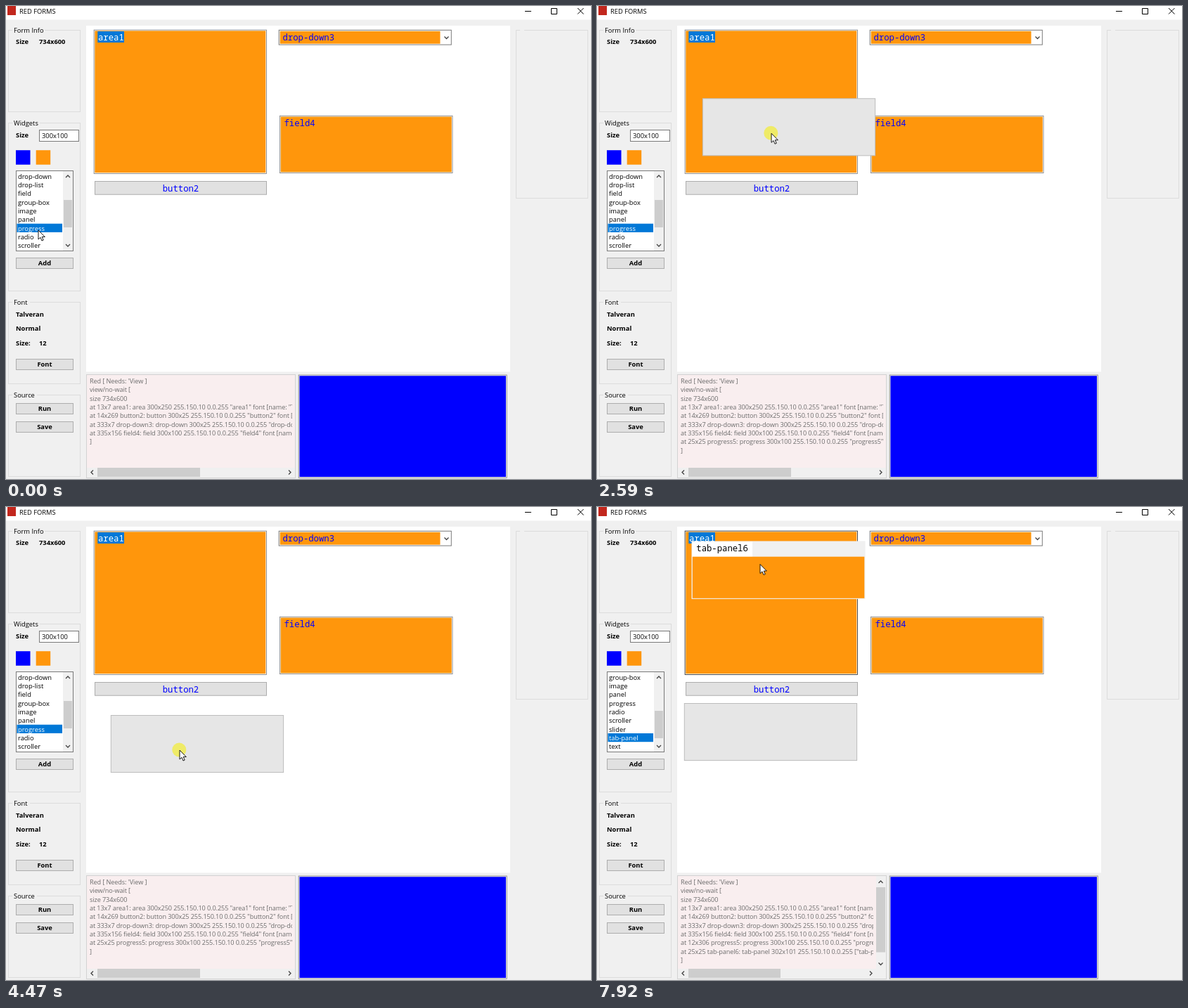
Animation of 832x673 px, one loop 7.99 s. Source, as an HTML page:

```html
<!DOCTYPE html>
<html lang="en">
<head>
<meta charset="utf-8">
<title>Red Forms</title>
<style>
  html, body { margin: 0; width: 100%; height: 100%; overflow: hidden; background: #f0f0f0; }
  svg { display: block; width: 832px; height: 673px; }
  text { font: 9.35px "Open Sans", "Noto Sans", sans-serif; white-space: pre; }
  .code { font-size: 9.15px; letter-spacing: -.1px; }
  .bold { font-weight: 700; }
  .mono { font: 12.25px "Noto Sans Mono", "DejaVu Sans Mono", monospace; }
  .mid { text-anchor: middle; }
  .button { fill: #e1e1e1; stroke: #adadad; }
  .hover { fill: #e5f1fb; stroke: #0078d7; }
  .down { fill: #cce4f7; stroke: #005499; }
</style>
</head>
<body>
<svg id="stage" viewBox="0 0 832 673" xmlns="http://www.w3.org/2000/svg"></svg>
<script>
const LOOP = 7990;
const ORANGE = '#ff960c', BLUE = '#0000ff', SELECT = '#0078d7', EDGE = '#7a7a7a';
const UNIT = .82; // one form pixel on the stage

// Shape helpers: corners are x1, y1, x2, y2
const box = (a, b, c, d, fill, extra = '') =>
  `<rect x="${a}" y="${b}" width="${c - a}" height="${d - b}" fill="${fill}" ${extra}/>`;
const frame = (a, b, c, d, fill, stroke, extra = '') =>
  box(a + .5, b + .5, c - .5, d - .5, fill, `stroke="${stroke}" ${extra}`);
const label = (x, y, text, cls = '', fill = '#000') =>
  `<text x="${x}" y="${y}" class="${cls}" fill="${fill}">${text}</text>`;
const line = (d, stroke = '#000', width = 1) =>
  `<path d="${d}" fill="none" stroke="${stroke}" stroke-width="${width}"/>`;
const group = (id, content, extra = '') => `<g id="${id}" ${extra}>${content}</g>`;

const chevron = (x, y, dx, dy) => line(dx
  ? `M${x - dx * 1.5} ${y - 3}l${dx * 3} 3l${-dx * 3} 3`
  : `M${x - 3} ${y - dy * 1.5}l3 ${dy * 3}l3 ${-dy * 3}`, '#444', 1.3);

const groupBox = (y1, y2, title, x = 3, gap = 9) =>
  frame(x, y1, x + 103, y2, 'none', '#dcdcdc') +
  box(x + 6, y1 - 2, x + 6 + gap, y1 + 2, '#f0f0f0') + label(x + 8, y1 + 4, title);

const button = (y, text, id = '') =>
  `<rect id="${id}" class="button" x="14.5" y="${y + .5}" width="81" height="15"/>` +
  label(55, y + 11.4, text, 'bold mid');

const sunken = (a, b, c, d, fill, id = '') => {
  const half = UNIT / 2, inset = UNIT * 2;
  return box(a + half, b + half, c - half, d - half, '#fff',
    `stroke="${EDGE}" stroke-width="${UNIT}" id="${id}"`) +
    box(a + inset, b + inset, c - inset, d - inset, fill);
};

const listView = (items, selected, thumb) => items.map((item, i) => {
  const y = 241.9 + i * 12.3, on = i === selected;
  return (on ? box(15.5, y - 6, 80, y + 6.2, SELECT) : '') +
    label(17, y + 3.9, item, '', on ? '#fff' : '#000');
}).join('') + box(82, thumb, 94, thumb + 39, '#cdcdcd');

const widgets = ['drop-down', 'drop-list', 'field', 'group-box', 'image', 'panel',
  'progress', 'radio', 'scroller', 'slider', 'tab-panel', 'text'];

const windowParts =
  box(0, 0, 832, 673, '#f0f0f0') + box(0, 0, 832, 19.5, '#fff') +
  box(2, 0, 14, 13, '#c2271d') + label(19, 10.5, 'RED FORMS') +
  line('M738 7.5h9M775.5 3.5h8v8h-8zM813 3l8.5 8.5M821.5 3l-8.5 8.5') +
  box(114, 28, 717, 520.5, '#fff');

const sidebar =
  groupBox(34, 151, 'Form Info', 3, 46) +
  label(14, 54, 'Size', 'bold') + label(47, 54, '734x600', 'bold') +
  groupBox(166, 406, 'Widgets', 3, 39) +
  label(14, 186.5, 'Size', 'bold') +
  frame(47, 176, 104, 193, '#fff', EDGE) + label(51, 188, '300x100') +
  box(14, 205.2, 34.5, 225.7, BLUE) + box(42.7, 205.2, 63.2, 225.7, ORANGE) +
  frame(14, 234, 96, 349, '#fff', EDGE) + box(81, 235, 95, 348, '#f0f0f0') +
  group('listBefore', listView(widgets.slice(0, 9), 6, 276)) +
  group('listAfter', listView(widgets.slice(3), 7, 290)) +
  chevron(88, 242.5, 0, -1) + chevron(88, 340.5, 0, 1) +
  button(358, 'Add', 'add') +
  groupBox(421, 538, 'Font', 3, 25) +
  ['Talveran', 'Normal', 'Size:'].map((s, i) => label(14, 441.7 + i * 20.4, s, 'bold')).join('') +
  label(47, 482.5, '12', 'bold') + button(502, 'Font') +
  groupBox(553, 670, 'Source', 3, 35) + button(565, 'Run') + button(591, 'Save') +
  groupBox(34, 274, '', 725, 6);

const form =
  sunken(124.7, 33.7, 370.9, 238.8, ORANGE, 'area') +
  box(130.3, 36, 168, 52, SELECT) + label(131, 48.5, 'area1', 'mono', '#fff') +
  frame(387.7, 33.8, 633.8, 55.6, '#fff', EDGE) + box(389.7, 35.8, 617.5, 53.7, ORANGE) +
  label(393.5, 48.5, 'drop-down3', 'mono', BLUE) + chevron(626.5, 45, 0, 1) +
  sunken(389, 155.9, 635.4, 238, ORANGE) + label(395.5, 170.8, 'field4', 'mono', BLUE) +
  frame(126, 249, 371, 268.7, '#e1e1e1', '#adadad') +
  label(248.5, 263.5, 'button2', 'mono mid', BLUE) +
  group('progress', frame(0, 0, 246.3, 82.1, '#e6e6e6', '#bcbcbc')) +
  group('tabs',
    box(0, 0, 247, 82.4, '#f0f0f0') + box(.8, .8, 86.5, 23, '#fff') +
    box(1.3, 22.2, 245.8, 81.3, ORANGE) + label(6.8, 14.7, 'tab-panel6', 'mono'),
    'transform="translate(134.5 48.5)"');

const codeLines = Array.from({ length: 10 }, (_, i) =>
  `<text class="code" x="119" y="${537 + i * 12.35}" fill="#6d6d6d"></text>`).join('');

const bottom =
  `<clipPath id="clip"><rect id="clipBox" x="115" y="525" width="292" height="131"/></clipPath>` +
  frame(114, 524, 412, 672, '#f9eeef', '#d2d2d2') +
  group('codeText', codeLines, 'clip-path="url(#clip)"') +
  box(115, 657, 411, 671, '#f0f0f0') + chevron(122.5, 663.5, -1, 0) +
  group('barShort', box(130, 657, 276, 670, '#cdcdcd') + chevron(403.5, 663.5, 1, 0)) +
  group('barLong', box(397, 525, 411, 671, '#f0f0f0') + box(397, 541, 410, 633.5, '#cdcdcd') +
    box(130, 657, 261, 670, '#cdcdcd') + chevron(389.5, 663.5, 1, 0) +
    chevron(403.5, 533.5, 0, -1) + chevron(403.5, 650, 0, 1)) +
  sunken(415.8, 524.6, 712.6, 671.6, BLUE);

const pointer = group('cursor',
  `<circle id="press" cx="-.7" cy="-.5" r="10" fill="#f0eb50" fill-opacity=".85"/>
   <path d="M0 0V13L3 10.3L5 15L7.2 14L5.2 9.5H9.3Z" fill="#fff" stroke="#000" stroke-width=".9"/>`);

document.getElementById('stage').innerHTML = windowParts + sidebar + form + bottom + pointer;
const el = id => document.getElementById(id);
const show = (id, on) => { el(id).style.display = on ? '' : 'none'; };

const bursts = [[180, 580, 7], [790, 1570, 12], [1640, 2400, 12], [2470, 3220, 13],
  [3290, 4070, 13], [4140, 4920, 13], [4970, 5480, 8], [5610, 5610, 1],
  [5860, 6640, 13], [6710, 7480, 12], [7530, 7920, 7]];
const ticks = [0, ...bursts.flatMap(([from, to, n]) =>
  Array.from({ length: n }, (_, i) => from + (n > 1 ? (to - from) * i / (n - 1) : 0)))];
const recorded = t => ticks.findLast(tick => tick <= t + 12);

// Pointer path: time, x, y
const path = [[0, 46, 319], [115, 46, 319], [580, 58, 369], [1400, 58, 369],
  [1640, 76, 344], [1900, 150, 230], [2190, 233, 98.5], [2262, 234, 102],
  [2400, 240, 132], [2970, 263.5, 276], [3220, 272, 313], [3485, 347, 348],
  [3800, 374, 359], [4070, 321, 360], [4465, 247, 346], [4920, 233, 345],
  [5480, 222, 329], [5609, 222, 329], [5610, 48, 325], [5800, 48, 325],
  [6150, 96, 291], [6640, 58, 356], [6780, 55, 368], [7290, 55, 368],
  [7480, 80, 345], [7530, 97, 318], [7920, 232, 81.5], [LOOP, 232, 81.5]];

function pointerAt(t) {
  const i = Math.max(1, path.findIndex(key => key[0] >= t));
  const [t0, x0, y0] = path[i - 1], [t1, x1, y1] = path[i];
  const k = (t - t0) / (t1 - t0);
  return [x0 + (x1 - x0) * k, y0 + (y1 - y0) * k];
}

const within = (t, ...spans) => spans.some(([from, to]) => t >= from && t < to);
const ADDED = 1080, GRABBED = 2180, DROPPED = 5600, TABBED = 7150;

function source(t) {
  const tail = name => `255.150.10 0.0.255 "${name}" font [name: "Talveran" size: 12]`;
  const out = ["Red [ Needs: 'View ]", 'view/no-wait [', 'size 734x600',
    `at 13x7 area1: area 300x250 ${tail('area1')}`,
    `at 14x269 button2: button 300x25 ${tail('button2')}`,
    `at 333x7 drop-down3: drop-down 300x25 ${tail('drop-down3')}`,
    `at 335x156 field4: field 300x100 ${tail('field4')}`];
  if (t >= ADDED) out.push(`at ${t < DROPPED ? '25x25' : '12x306'} progress5: progress 300x100 ${tail('progress5')}`);
  if (t >= TABBED) out.push('at 25x25 tab-panel6: tab-panel 302x101 255.150.10 0.0.255 ["tab-panel6" []]');
  return [...out, ']'];
}

const codeNodes = document.querySelectorAll('.code');
let last = -1;

function draw(now) {
  const t = recorded(now % LOOP);
  if (t !== last) {
    last = t;
    const [x, y] = pointerAt(t);
    const clicking = within(t, [850, ADDED], [6850, 7080]);
    const hovering = within(t, [480, 1640], [6700, 7530]);
    const tabbed = t >= TABBED;

    el('cursor').setAttribute('transform', `translate(${x} ${y})`);
    show('press', clicking || within(t, [GRABBED, DROPPED]));
    el('add').setAttribute('class', clicking ? 'button down' : hovering ? 'button hover' : 'button');
    el('area').setAttribute('stroke', within(t, [1950, 2390], [7690, LOOP]) ? '#222' : EDGE);

    const [px, py] = t < GRABBED ? [134.5, 48.5] : t < DROPPED ? [x - 98.2, y - 50] : [123.8, 279];
    el('progress').setAttribute('transform', `translate(${px} ${py})`);
    show('progress', t >= ADDED);
    show('tabs', tabbed);
    show('listBefore', t < DROPPED);
    show('listAfter', t >= DROPPED);
    show('barShort', !tabbed);
    show('barLong', tabbed);
    el('clipBox').setAttribute('width', tabbed ? 278 : 292);
    const text = source(t);
    codeNodes.forEach((node, i) => { node.textContent = text[i] || ''; });
  }
  requestAnimationFrame(() => draw(performance.now() - start));
}

const start = performance.now();
draw(0);
</script>
</body>
</html>
```
